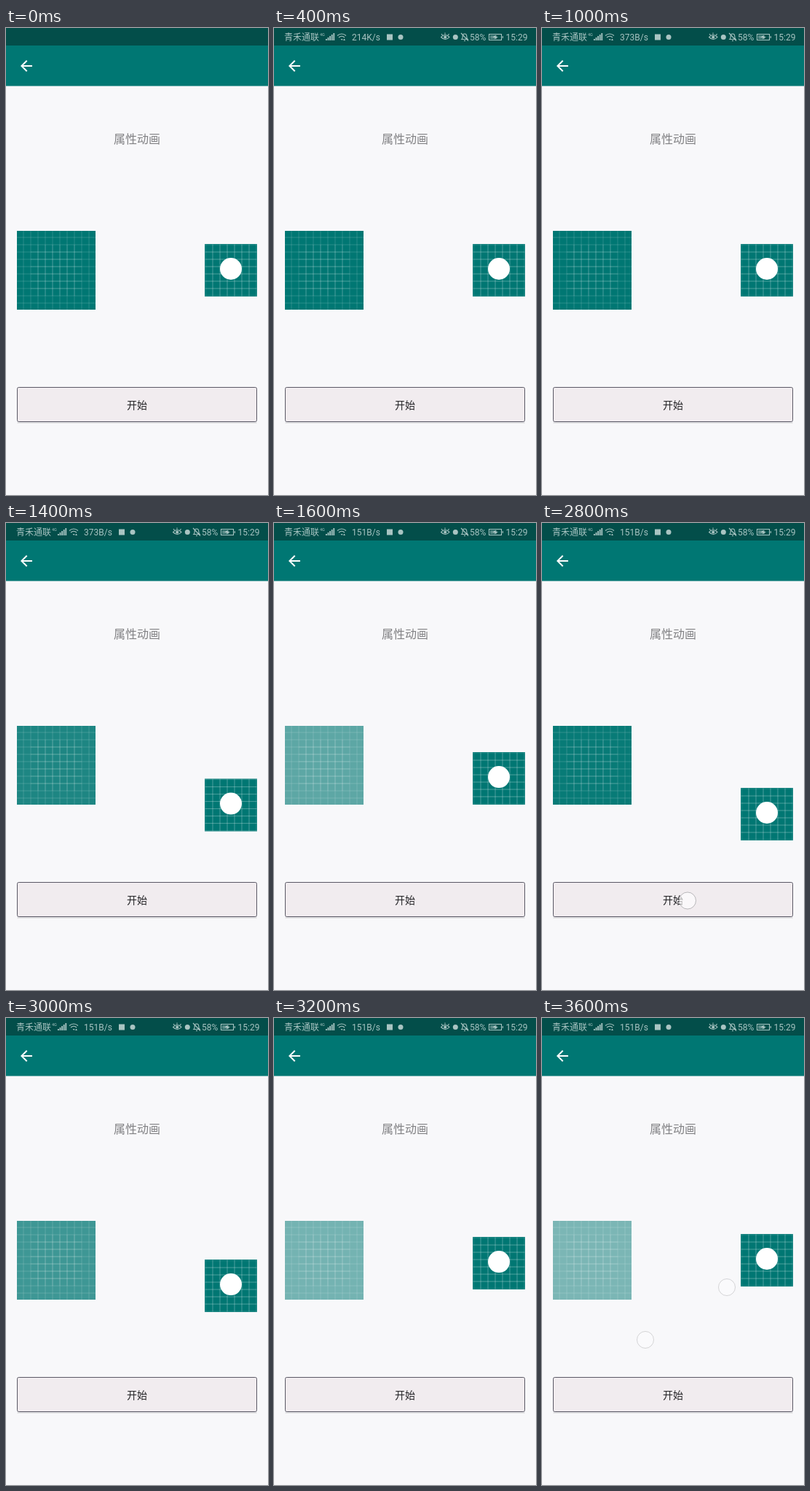
These frames come from a looping animation (360 by 640 pixels, 3.7 s). An HTML page:

```html
<!DOCTYPE html>
<html lang="zh">
<head>
<meta charset="utf-8">
<title>属性动画</title>
<style>
  html, body { margin: 0; width: 100%; height: 100%; overflow: hidden; background: #f8f8fa; }
  svg { display: block; }
  text { font-family: Roboto, "Noto Sans CJK SC", "Noto Sans CJK", sans-serif; }
  #status { font-size: 12px; fill: #a9c4c2; }
  .line { fill: none; stroke: #a9c4c2; stroke-width: 1.1; }
  .touch { fill: #fff; fill-opacity: .65; stroke: #7c7c80; stroke-opacity: .5; }
</style>
</head>
<body>
<svg width="360" height="640" viewBox="0 0 360 640">
  <defs>
    <g id="tile">
      <path d="M0 0H108V108H0z" fill="#007773"/>
      <path id="grid" fill="none" stroke="#fff" stroke-opacity=".2" stroke-width=".8"/>
    </g>
  </defs>

  <path d="M0 0H360V24H0z" fill="#034e4a"/>
  <path d="M0 24H360V79.500H0z" fill="#007773"/>
  <path transform="translate(16 40)" fill="#fff"
        d="M20 11H7.830l5.590-5.590L12 4l-8 8 8 8 1.410-1.410L7.830 13H20z"/>

  <g id="status">
    <text x="14" y="17">青禾通联</text>
    <text x="63" y="11" font-size="5.500">4G</text>
    <path d="M71 15h1.800v2h-1.800zM73.600 13h1.800v4h-1.800zM76.200 11h1.800v6h-1.800zM78.800 9h1.800v8h-1.800zM81.400 7h1.800v10h-1.800z"/>
    <path class="line" d="M87 10.500q6-5 12 0M89 13q4-3.400 8 0"/>
    <path d="M91.500 15l2 2 1-2zM95 17l1.500-2.500 1.500 2.500z"/>
    <text id="speed" x="107" y="17"></text>
    <path d="M155 8.500h8v8h-8z"/>
    <circle cx="174" cy="12.500" r="3.500"/>
    <path class="line" d="M229.500 12.500q5.500-6 11.500 0q-5.500 6-11.500 0zM230 8l1.500 2M235 6.500v2M240.500 8l-1.500 2"/>
    <circle cx="235.200" cy="12.500" r="2"/>
    <circle cx="249.300" cy="12.500" r="3.500"/>
    <path class="line" d="M258 15.500h8q-1.200-1-1.200-4q0-3.500-2.800-3.500t-2.800 3.500q0 3-1.200 4zM261 17.500h2M257 7l10 10.500"/>
    <text x="269" y="17">58%</text>
    <path class="line" d="M295.500 8.500h17v8h-17zM314.300 11v3"/>
    <path d="M297 10h9v5h-9z" opacity=".5"/>
    <path d="M300 13l5-3.500-.500 2.500h3.500l-5 3.500.500-2.500z"/>
    <text x="318.500" y="17">15:29</text>
  </g>

  <text x="180" y="158" font-size="16" text-anchor="middle" fill="#808083">属性动画</text>

  <use id="fader" href="#tile" x="15" y="278"/>
  <g id="mover">
    <svg x="273" y="296" width="72" height="72" viewBox="18 18 72 72">
      <use href="#tile"/>
      <circle cx="54" cy="52" r="15" fill="#fff"/>
    </svg>
  </g>

  <rect id="shadow" x="14" y="494" width="332" height="50" rx="3" opacity=".12"/>
  <path d="M15.500 541H344.500" stroke="#000" stroke-opacity=".2"/>
  <rect x="15.500" y="492.500" width="329" height="47" rx="2" fill="#f1ecef" stroke="#5b5966"/>
  <text x="180" y="521.500" font-size="14" font-weight="500" text-anchor="middle" fill="#232326">开始</text>

  <circle id="tap" class="touch" cx="200" cy="517.500" r="11.500"/>
  <g id="knuckles" opacity=".6">
    <circle class="touch" cx="254" cy="369" r="11.500"/>
    <circle class="touch" cx="142" cy="441" r="11.500"/>
  </g>
</svg>
<script>
const LOOP = 3700, STEP = 100;
const RUN_STARTS = [1207, 2700], RUN_TIME = 590, DROP = 72;
const [grid, status, speed, fader, mover, shadow, tap, knuckles] =
  ['grid', 'status', 'speed', 'fader', 'mover', 'shadow', 'tap', 'knuckles']
    .map(id => document.getElementById(id));

// Full grid plus a second, inner set of lines
let lines = '';
for (let p = 9; p < 108; p += 10) {
  lines += `M${p} 0V108M0 ${p}H108`;
  if (p > 19 && p < 89) lines += `M${p} 19V89M19 ${p}H89`;
}
grid.setAttribute('d', lines);

const show = (el, visible) => el.setAttribute('visibility', visible ? 'visible' : 'hidden');
const within = (t, from, to) => t >= from && t < to;
const ease = x => .5 - .5 * Math.cos(Math.PI * x);

function draw(t) {
  const start = RUN_STARTS.filter(s => s <= t).pop();
  const running = start !== undefined;
  const done = running ? ease(Math.min(1, (t - start) / RUN_TIME)) : 0;
  fader.setAttribute('opacity', 1 - .5 * done);
  mover.setAttribute('transform', `translate(0 ${running ? DROP * (1 - done) : 0})`);

  show(status, t >= 100);
  speed.textContent = t < 700 ? '214K/s' : t < 1500 ? '373B/s' : '151B/s';
  show(shadow, within(t, 1200, 1400) || within(t, 2600, 2800));
  show(tap, within(t, 1200, 1400) || within(t, 2600, 2900));
  show(knuckles, t >= 3500);
}

const origin = performance.now();
function tick() {
  const t = (performance.now() - origin) % LOOP;
  draw(Math.floor(t / STEP) * STEP);
  requestAnimationFrame(tick);
}
tick();
</script>
</body>
</html>
```
